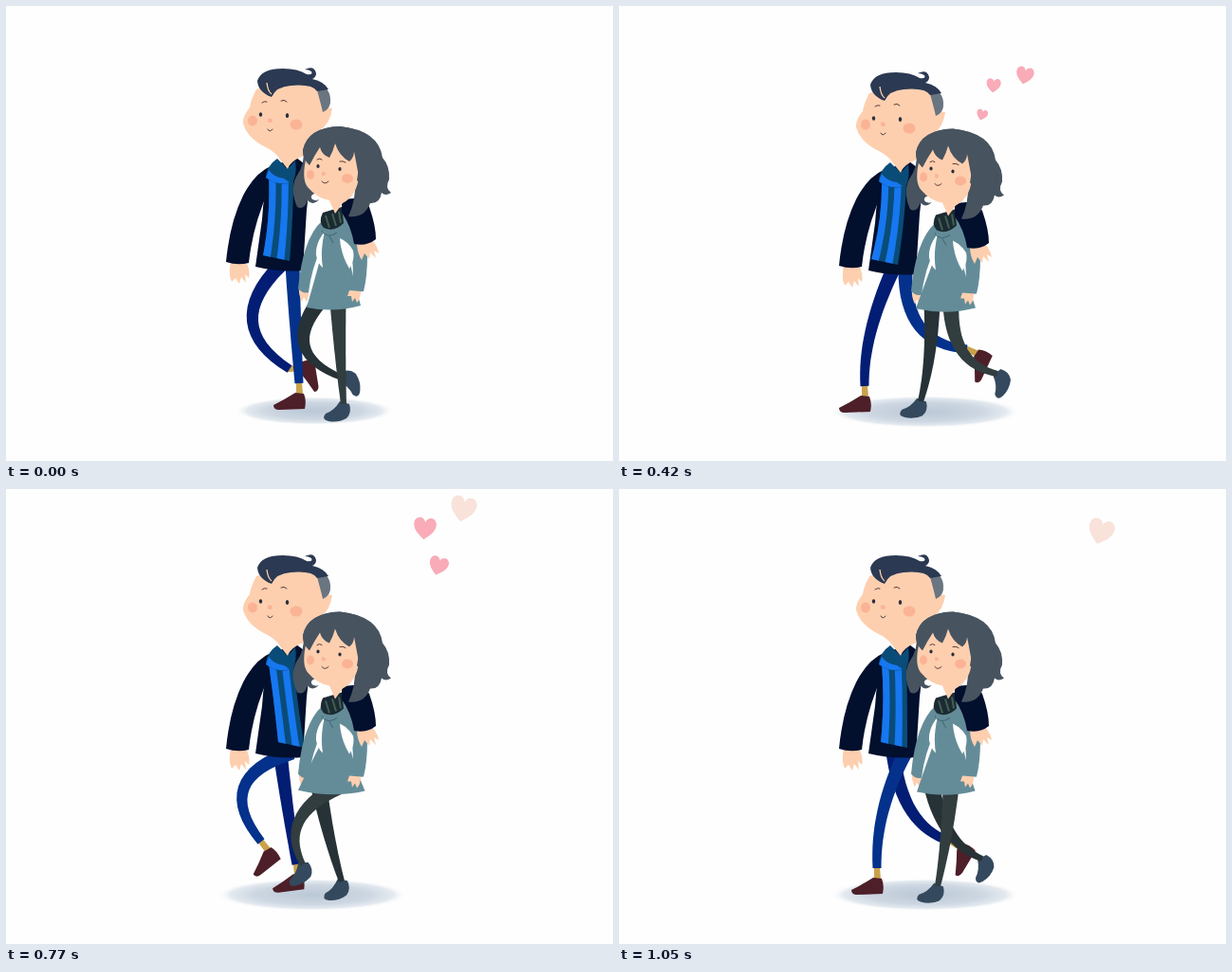
Write an HTML page that moves like this. It is 640x480 px and loops after 1.12 s.

```html
<!DOCTYPE html>
<html lang="en">
<head>
<meta charset="utf-8">
<title>Walking couple</title>
<style>
html, body { margin: 0; width: 100%; height: 100%; overflow: hidden; background: #fefefe; }
svg { display: block; width: 640px; height: 480px; }
.skin { fill: #fdcfaf; }
.coat { fill: #020f2d; }
.dress { fill: #648c98; }
.hair { fill: #47535f; }
.blush { fill: #f9a98c; opacity: .75; }
.line { fill: none; stroke: #5a3a38; stroke-width: 1; stroke-linecap: round; }
.eye { fill: #2a2f3c; }
.heart { fill: #f9abb8; }
</style>
</head>
<body>
<svg viewBox="0 0 640 480">
  <defs>
    <radialGradient id="soft">
      <stop offset="0" stop-color="#bac7d5"/>
      <stop offset=".6" stop-color="#cdd7e2"/>
      <stop offset=".85" stop-color="#e3e9ef"/>
      <stop offset="1" stop-color="#fefefe" stop-opacity="0"/>
    </radialGradient>
    <g id="boot">
      <path d="M-3-2L3-2L4 13L-3 13Z" fill="#c9a24c"/>
      <path d="M-4 10Q-15 17-27 23Q-27 28-21 28L6 27Q8 18 5 11Z" fill="#4d1f29"/>
    </g>
    <path id="flat" d="M-4-3Q-10 7-19 10Q-24 16-16 18Q-6 20 3 15Q9 9 6 0Z" fill="#34495d"/>
  </defs>

  <ellipse id="shadow" fill="url(#soft)"/>
  <g id="hearts"></g>

  <g id="manLegs"></g>
  <g class="man">
    <path class="skin" d="M237 270L253 270Q258 279 256 287L252 283L253 292L248 286L246 293L242 287L238 291Q234 283 237 270Z"/>
    <path class="coat" d="M281 168Q262 176 250 200Q236 228 232 270Q244 274 256 271Q260 232 277 194Z"/>
    <path class="coat" d="M283 168Q271 195 270 225L263 275Q288 281 313 279L317 215L322 172L306 160Z"/>
    <g id="scarf"></g>
    <path d="M281 165Q274 173 274 181Q288 192 303 185Q307 175 305 163L297 172L286 161Z" fill="#0a4c78"/>
    <path d="M277 173Q283 181 293 182L299 186Q286 190 274 181Z" fill="#1677f0"/>
    <path class="skin" d="M264 88Q258 99 257 107Q249 117 250 124Q254 138 270 147Q285 154 289 162L297 172Q300 163 314 158Q315 144 331 131Q342 124 344 108Q340 106 334 111L330 83Q300 74 264 88Z"/>
    <path d="M326 82Q341 84 342 98Q343 108 334 112Q331 99 326 82Z" fill="#697580"/>
    <path d="M265 79Q269 66 292 66Q308 66 317 72Q324 73 322 69Q319 67 315 67Q325 62 327 71Q327 75 323 77Q336 80 340 88L328 90Q323 82 300 84Q285 85 280 96Q266 91 265 79Z" fill="#2b3952"/>
    <path d="M275 81Q276 90 280 93" fill="none" stroke="#fdcfaf" stroke-width="1.3"/>
    <ellipse class="blush" cx="260" cy="121" rx="5" ry="5.5"/>
    <ellipse class="blush" cx="306" cy="125" rx="6.5" ry="5.5"/>
    <ellipse class="eye" cx="268.5" cy="114.500" rx="1.700" ry="2.300"/>
    <ellipse class="eye" cx="296.500" cy="115.500" rx="1.700" ry="2.500"/>
    <path class="line" d="M270 102Q272 100 275 101M290 100Q293 98 296 101M276 130Q278 134 281 130"/>
    <path class="blush" d="M276 119Q281 117 281 122Q278 124 276 122Z"/>
  </g>

  <g id="womanLegs"></g>
  <g class="woman">
    <path class="skin" d="M309 296L319 298Q320 305 317 312L314 307L312 312Q308 304 309 296Z"/>
    <path class="dress" d="M334 226Q313 244 308 298Q313 304 319 302Q323 270 340 240Z"/>
    <path class="dress" d="M352 218Q378 232 381 262Q381 286 377 301L362 302Q372 272 356 242Z"/>
    <path id="skirt" class="dress"/>
    <path d="M336 238Q326 250 327 263Q329 272 334 276Q331 258 336 238Z" fill="#fefefe"/>
    <path d="M352 245Q353 262 362 277Q368 268 366 258Q361 249 352 245Z" fill="#fefefe"/>
    <path class="skin" d="M362 300L374 301Q374 309 370 313L368 308L365 312L364 306L360 306Z"/>
    <path d="M334 218Q329 228 335 234Q346 239 356 229L354 212Z" fill="#1b2a33"/>
    <path d="M337 221L341 234M344 219L348 232M351 217L353 229" stroke="#42604f" stroke-width="2"/>
    <path d="M333 237Q339 246 349 239M341 243L345 250" fill="none" stroke="#456d7b" stroke-width="1.200"/>
  </g>
  <g class="man">
    <path class="skin" d="M370 250L386 247Q392 254 393 261L388 258L390 266L384 260L383 267L378 261L375 268Q370 260 370 250Z"/>
    <path class="coat" d="M354 205Q376 199 383 212Q390 232 390 246Q380 254 367 251Q364 232 354 218Z"/>
  </g>
  <g class="woman">
    <path class="hair" d="M313 152Q318 128 352 127Q393 131 397 160Q405 169 404 183Q399 192 406 197Q400 201 396 197Q394 209 384 208Q378 224 361 222Q369 205 368 185L334 196Q318 198 323 204Q329 207 332 202Q324 212 318 205Q314 216 307 212Q299 194 306 180Q316 166 313 152Z"/>
    <path class="skin" d="M317 158Q311 182 318 191Q328 203 341 205L347 219L355 208Q370 200 372 180L366 148Q335 135 317 158Z"/>
    <path class="hair" d="M313 152Q318 128 352 127Q387 130 396 160L398 187Q381 194 370 184Q374 166 367 153Q367 160 362 164Q351 158 347 145Q345 153 341 160Q333 157 331 149Q325 158 320 168Q313 162 313 152Z"/>
    <ellipse class="blush" cx="321" cy="178" rx="4" ry="5"/>
    <ellipse class="blush" cx="360" cy="182" rx="6" ry="5"/>
    <ellipse class="eye" cx="329" cy="169" rx="1.600" ry="2"/>
    <ellipse class="eye" cx="352" cy="172" rx="1.600" ry="2"/>
    <path class="line" d="M328 162Q331 160 333 162M352 164Q355 163 358 165M333 185Q336 189 340 185"/>
    <path class="blush" d="M333 175Q337 174 337 178Q334 180 333 178Z"/>
  </g>
</svg>

<script>
const STEP = 70, STEPS = 16;
const $ = id => document.getElementById(id);

// Each leg pose: knee control x, y, ankle x, y, foot angle.
const man = {
  hips: [[289, '#021d73'], [302, '#04318b']], hipY: 274, shoe: 'boot', w0: 15, w1: 9,
  legs: [
    [[226, 337, 299, 383, -97], [208, 308, 250, 374, -28], [256, 345, 236, 398, 28], [257, 347, 259, 401, 0],
     [287, 340, 288, 399, 0], [297, 340, 306, 396, -5], [288, 350, 330, 386, -42], [298, 356, 350, 372, -57]],
    [[305, 340, 309, 398, 0], [311, 340, 326, 396, -8], [303, 354, 352, 384, -44], [300, 357, 367, 362, -63],
     [246, 332, 315, 378, -100], [216, 306, 269, 372, -36], [280, 345, 252, 397, 23], [270, 340, 272, 400, 0]]
  ]
};
const woman = {
  hips: [[330, '#263236'], [350, '#313d3f']], hipY: 312, shoe: 'flat', w0: 17, w1: 6,
  legs: [
    [[288, 366, 354, 392, -95], [284, 346, 292, 396, -16], [318, 365, 293, 413, 23], [330, 375, 318, 417, 4],
     [338, 370, 339, 418, 0], [340, 370, 354, 414, -8], [350, 375, 371, 402, -32], [342, 375, 383, 390, -43]],
    [[352, 370, 356, 420, 0], [358, 370, 374, 414, -12], [360, 378, 392, 405, -40], [350, 378, 399, 388, -55],
     [302, 368, 361, 391, -85], [286, 346, 313, 396, -22], [338, 360, 309, 418, 16], [346, 370, 336, 419, 4]]
  ]
};
const scarfX = [285, 275, 270, 280, 286, 301, 299, 290];
const flare = [0, 8, 10, 4, 0, 9, 9, 3];

// Hearts: first step, then x and y as quadratics of age, and tilt.
const hearts = [
  { start: 1, x: [365, 13.4, -.17], y: [114, -7, -.23], tilt: 12 },
  { start: 3, x: [363, 11.1, -.16], y: [104.5, -6.3, -.195], tilt: 6 },
  { start: 5, x: [367, 15.9, -.18], y: [120, -5, -.25], tilt: 16 }
];
const heartPath = 'M0 13C-6 8-13 3-13-5C-13-14-2-15 0-7C2-15 13-14 13-5C13 3 6 8 0 13Z';
const heartFill = { 9: '#f8c6c9', 10: '#f8e2da' };

const quad = (a, b, c, u) => (1 - u) ** 2 * a + 2 * u * (1 - u) * b + u * u * c;
const poly = ([a, b, c], t) => a + b * t + c * t * t;

// Outline of a tapered limb along a quadratic curve.
function limb(hx, hy, [kx, ky, ax, ay], w0, w1) {
  const left = [], right = [], n = 16;
  for (let i = 0; i <= n; i++) {
    const u = i / n, x = quad(hx, kx, ax, u), y = quad(hy, ky, ay, u);
    const dx = (1 - u) * (kx - hx) + u * (ax - kx), dy = (1 - u) * (ky - hy) + u * (ay - ky);
    const r = (w0 + (w1 - w0) * u) / 2 / Math.hypot(dx, dy);
    left.push([x - dy * r, y + dx * r]);
    right.unshift([x + dy * r, y - dx * r]);
  }
  return 'M' + left.concat(right).map(p => p.map(v => v.toFixed(1))).join('L') + 'Z';
}

function drawLegs(who, pose, bob) {
  return who.hips.map(([x, fill], side) => {
    const leg = who.legs[side][pose], [, , ax, ay, turn] = leg;
    return `<use href="#${who.shoe}" transform="translate(${ax} ${ay}) rotate(${turn})"/>
      <path fill="${fill}" d="${limb(x, who.hipY + bob, leg, who.w0, who.w1)}"/>`;
  }).join('');
}

function drawScarf(bx) {
  const edge = u => [277 + 26 * u, 279 + 24 * u + (bx - 285) * .25, bx - 14 + 28 * u, 263 + 6 * u];
  const strip = (u, v, fill) => {
    const [a, b, c, d] = edge(u), [e, f, g, h] = edge(v);
    return `<path fill="${fill}" d="M${a} 180Q${b} 222 ${c} ${d}L${g} ${h}Q${f} 222 ${e} 180Z"/>`;
  };
  return strip(0, 1, '#0a4c78') + strip(0, .28, '#1677f0') + strip(.52, .8, '#1677f0');
}

function drawHeart(h, step) {
  const age = step - h.start;
  if (age < 0 || age > 10) return '';
  const size = (10 + 1.7 * age) / 26;
  return `<path class="heart" style="fill:${heartFill[age] || ''}" d="${heartPath}"
    transform="translate(${poly(h.x, age)} ${poly(h.y, age)}) rotate(${h.tilt}) scale(${size})"/>`;
}

function move(selector, y) {
  document.querySelectorAll(selector).forEach(g => g.setAttribute('transform', `translate(0 ${y})`));
}

function draw(step) {
  const pose = step >> 1, dip = [0, 1, 2, 1][pose % 4], h = flare[pose];
  move('.man', 4 * dip);
  move('.woman', 2.5 * dip);
  $('manLegs').innerHTML = drawLegs(man, pose, 4 * dip);
  $('womanLegs').innerHTML = drawLegs(woman, pose, 2.5 * dip);
  $('scarf').innerHTML = drawScarf(scarfX[pose]);
  $('skirt').setAttribute('d', `M335 226L354 222Q366 244 361 262Q366 288 ${374 + h * .5} 316
    Q345 324 ${317 - h} ${318 - h * .3}Q${325 - h * .6} 290 331 268Q325 248 335 226Z`);
  $('hearts').innerHTML = hearts.map(p => drawHeart(p, step)).join('');
  const shadow = { cx: 325 - 2.5 * dip, cy: 427 + dip, rx: 84 + 16.5 * dip, ry: 15 + 2 * dip };
  for (const key in shadow) $('shadow').setAttribute(key, shadow[key]);
}

let last = -1;
const begin = performance.now();
function tick() {
  const step = Math.floor((performance.now() - begin) / STEP) % STEPS;
  if (step !== last) draw(last = step);
  requestAnimationFrame(tick);
}
tick();
</script>
</body>
</html>
```
